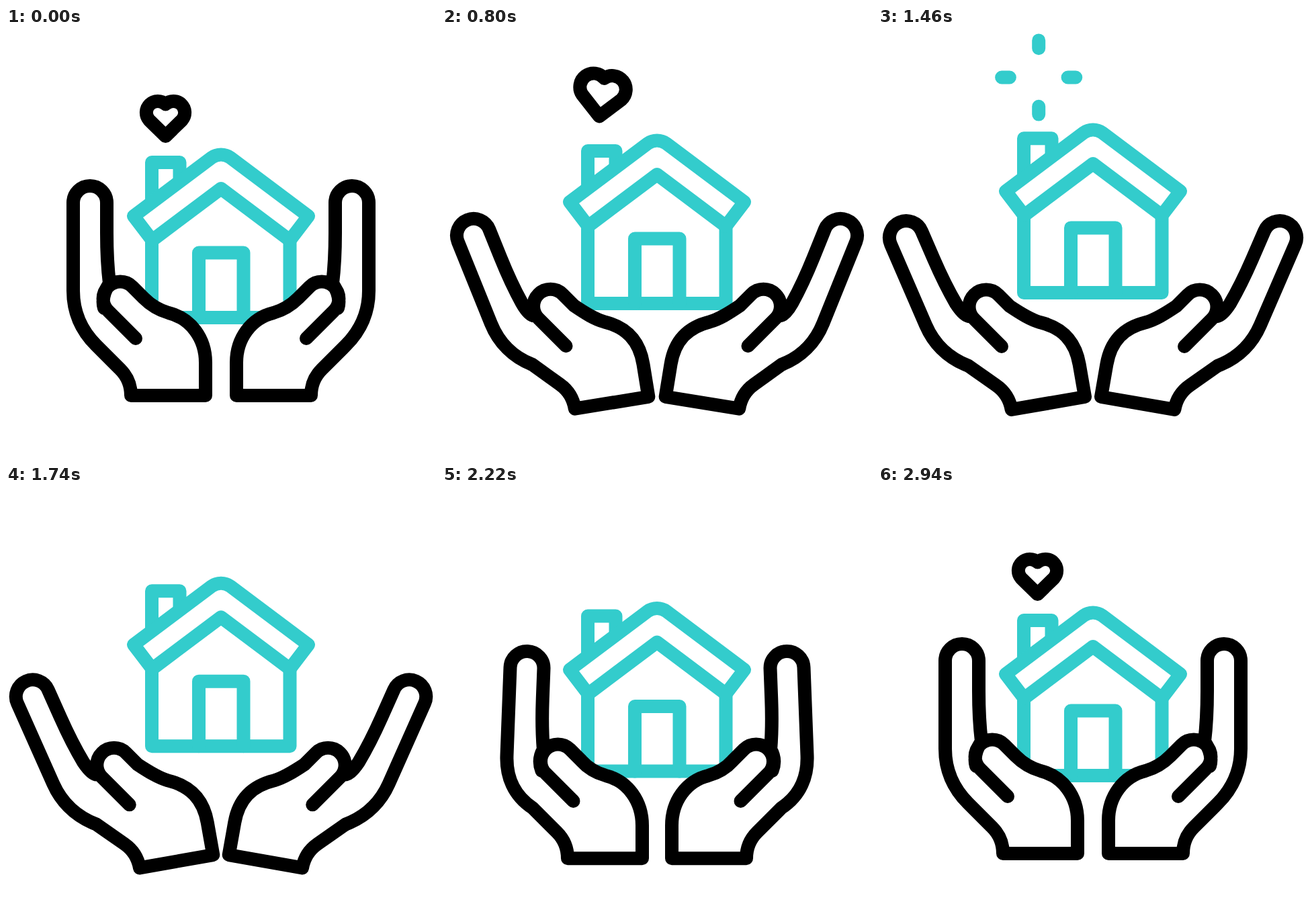
Animation, 640 px wide and 640 px high, one loop 3 s. Source, as an HTML page:

```html
<!DOCTYPE html>
<html lang="en">
<head>
<meta charset="utf-8">
<title>Home in caring hands</title>
<style>
  html, body { margin: 0; width: 100%; height: 100%; overflow: hidden; background: #fff; }
  svg { display: block; width: 100vw; height: 100vh; }
  .line { fill: none; stroke-width: 20; stroke-linecap: round; stroke-linejoin: round; }
  .teal { stroke: #33cccc; }
  .black { stroke: #000; }
  .solid { fill: #fff; }
</style>
</head>
<body>
<svg viewBox="0 0 640 640">
  <path id="chimney" class="line teal" d="M217 266V200H258.5V246"/>
  <g id="house" class="line teal">
    <path d="M217 318V431H422.5V318"/>
    <path d="M287 431V334.5H353.5V431"/>
    <path class="solid" d="M334 193L450 280L422.5 316L320 239L217.5 316L190 280L306 193C314 187 326 187 334 193Z"/>
  </g>
  <path id="hand" class="line black solid"/>
  <use href="#hand" transform="translate(640) scale(-1 1)"/>
  <path id="sparks" class="line teal"/>
  <path id="heart" class="line black" d="M0 26.5L-24.5 2.5A17 17 0 0 1 0 -21A17 17 0 0 1 24.5 2.5Z"/>
</svg>
<script>
const LOOP = 3000, START = 135, DIP = 370, OPEN = 585, POP = 1020, CLOSE = 1780, SHUT = 2215, REST = 2940;
const [chimney, house, hand, sparks, heart] =
  ['chimney', 'house', 'hand', 'sparks', 'heart'].map(id => document.getElementById(id));

const clamp = u => Math.min(1, Math.max(0, u));
const mix = (a, b, u) => a + (b - a) * u;
const blend = (a, b, u) => Object.fromEntries(
  Object.keys(a).map(k => [k, a[k].map((v, i) => mix(v, b[k][i], u))]));
const show = (node, on) => { node.style.display = on ? '' : 'none'; };

// Linear motion between [time, value] stops, resting before the first and after the last
function track(stops, t, between = mix) {
  const i = stops.findIndex(([time]) => time > t);
  if (i < 1) return stops.at(i)[1];
  const [t0, a] = stops[i - 1], [t1, b] = stops[i];
  return between(a, b, (t - t0) / (t1 - t0));
}

// Each point belongs to a rigid part: finger, wrist, palm or thumb.
// The tiny arc radius grows to fit, which gives an exact half circle.
const outline = `M t146,417 Q w141,400 f154,380 C f151,355 f150,325 f150,305
  L f150,260 A 1 1 0 0 0 f100,260 L f100,391 C f100,422 f112,450 w134,472
  L w170,508 C w180,518 w186,532 w186,547 L w297,547 L w297,498
  C w297,462 p275,432 p242,424 C p228,420 p215,412 t205,402
  L t188,385 A 1 1 0 0 0 t152,421 L t193,462`;
const pivots = { f: [125, 260], w: [297, 547], p: [0, 0], t: [0, 0] };

// Pose of each part: turn in degrees, then shift
const cupped = { f: [0, 0, 0], w: [0, 0, 0], p: [0, 0, 0], t: [0, 0, 0] };
const spread = { f: [23.4, -83, 52], w: [9.8, 11, 2], p: [0, -1, 14], t: [0, -9, 12] };
const sunk = { f: [-2.2, 1.5, 11], w: [0, 1, 7.3], p: [0, 1.5, 7], t: [0, 2.5, 7] };

const handStops = [
  [START, cupped], [OPEN, blend(cupped, spread, 0.92)],
  [CLOSE, blend(cupped, spread, 1.03)], [SHUT, sunk], [REST, cupped]];

// The chimney dips less than the house, then both rise to one height
const liftStops = (dip, rise) => [
  [START, 0], [DIP, dip], [OPEN, rise], [CLOSE, -44.8], [SHUT, -6.6], [REST, 0]];
const houseStops = liftStops(18.5, -15.8);
const chimneyStops = liftStops(8.5, -10.8);

function handPath(pose) {
  return outline.replace(/([fwpt])(\d+),(\d+)/g, (_, part, x, y) => {
    const [turn, dx, dy] = pose[part], [px, py] = pivots[part];
    const c = Math.cos(turn * Math.PI / 180), s = Math.sin(turn * Math.PI / 180);
    const rx = x - px, ry = y - py;
    return `${(px + dx + rx * c + ry * s).toFixed(2)} ${(py + dy - rx * s + ry * c).toFixed(2)}`;
  });
}

// The heart drifts up and swells until it pops, then grows back over the chimney
function drawHeart(t) {
  const rising = t < POP;
  const u = rising ? Math.max(0, (t - 150) / 650) : 0;
  const q = u * u;
  const scale = rising ? 1 + 0.2 * u ** 1.5 : clamp((t - SHUT) / (REST - SHUT));
  show(heart, scale > 0.01);
  heart.style.strokeWidth = rising ? 20 / scale : 20;
  heart.setAttribute('transform',
    `translate(${237.5 + 0.7 * q} ${134.5 - 34.5 * q}) rotate(${7.5 * q}) scale(${scale})`);
}

function drawSparks(t) {
  const reach = 57, x = 239.2, y = 73.5;
  const outer = reach * (1 - (1 - clamp((t - POP) / 540)) ** 2);
  const inner = reach * (t - POP) / 580;
  show(sparks, t >= POP && inner < outer);
  let d = '';
  for (let k = 0; k < 4; k++) {
    const dx = Math.cos(k * Math.PI / 2), dy = Math.sin(k * Math.PI / 2);
    d += `M${x + dx * inner} ${y + dy * inner}L${x + dx * outer} ${y + dy * outer}`;
  }
  sparks.setAttribute('d', d);
}

function draw(t) {
  chimney.setAttribute('transform', `translate(0 ${track(chimneyStops, t)})`);
  house.setAttribute('transform', `translate(0 ${track(houseStops, t)})`);
  hand.setAttribute('d', handPath(track(handStops, t, blend)));
  drawHeart(t);
  drawSparks(t);
}

const begin = performance.now();
function tick() {
  draw((performance.now() - begin) % LOOP);
  requestAnimationFrame(tick);
}
tick();
</script>
</body>
</html>
```
